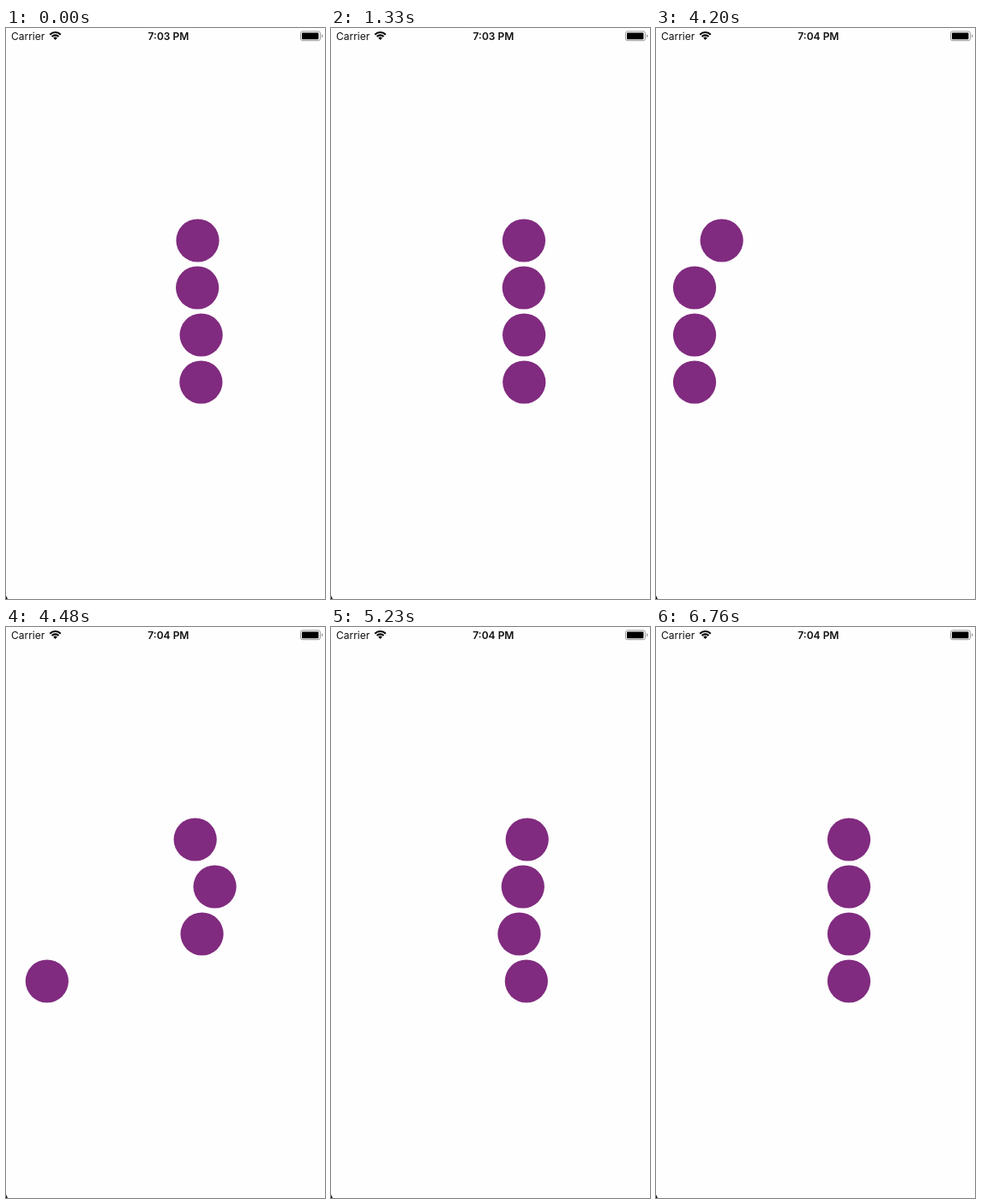
Recreate the animation shown at these times as an HTML page with a canvas. Size 372 px wide and 665 px high, loop 8 s.

```html
<!DOCTYPE html>
<html lang="en">
<head>
<meta charset="utf-8">
<title>Staggered springs</title>
<style>
  html, body { margin: 0; width: 100%; height: 100%; overflow: hidden; background: #fefefe; }
  canvas { display: block; width: 372px; height: 665px; }
</style>
</head>
<body>
<canvas id="stage"></canvas>
<script>
const W = 372, H = 665, LOOP = 8000;
const canvas = document.getElementById('stage');
const ctx = canvas.getContext('2d');
const dpr = window.devicePixelRatio || 1;
canvas.width = W * dpr;
canvas.height = H * dpr;

const LEFT = 45, STAGGER = 0.109, TICK = 58.25;
const DECAY = 2, FREQ = 15.04;

// Two runs of the same spring: the first is already under way at time zero.
const RUNS = [
  { from: 0, lag: 6.95, start: -1316, ticks: 23 },
  { from: 4200, lag: 10.85, start: 4150, ticks: 44 }
];

// Spring value to horizontal travel, steep first and flat near the end.
const TRAVEL = [[0, 0], [0.26, 32], [0.56, 166.8], [1, 180]];

function spring(s) {
  if (s <= 0) return 0;
  const p = FREQ * s;
  return 1 - Math.exp(-DECAY * s) * (Math.cos(p) + DECAY / FREQ * Math.sin(p));
}

function travel(v) {
  let i = 1;
  while (i < TRAVEL.length - 1 && v > TRAVEL[i][0]) i++;
  const [v0, x0] = TRAVEL[i - 1], [v1, x1] = TRAVEL[i];
  return x0 + (x1 - x0) * (v - v0) / (v1 - v0);
}

function ballX(t, i) {
  const run = RUNS[t < RUNS[1].from ? 0 : 1];
  const tick = Math.floor((t - run.from + run.lag) / TICK);
  if (tick >= run.ticks) return LEFT + 180;
  const now = run.from + tick * TICK;
  return LEFT + travel(spring((now - run.start) / 1000 - i * STAGGER));
}

function polygon(points, fill) {
  ctx.beginPath();
  points.forEach(([x, y]) => ctx.lineTo(x, y));
  ctx.closePath();
  ctx.fillStyle = fill;
  ctx.fill();
}

function roundBox(x, y, w, h, r) {
  ctx.beginPath();
  ctx.roundRect(x, y, w, h, r);
}

function wifi(x, y) {
  const a0 = -Math.PI * 0.75, a1 = -Math.PI * 0.25;
  ctx.fillStyle = '#000';
  for (const [inner, outer] of [[0, 3.3], [4.5, 6.6], [7.8, 9.9]]) {
    ctx.beginPath();
    ctx.arc(x, y, outer, a0, a1);
    ctx.arc(x, y, inner, a1, a0, true);
    ctx.fill();
  }
}

function battery() {
  roundBox(343.5, 3.9, 23, 10.8, 2.4);
  ctx.strokeStyle = '#999';
  ctx.lineWidth = 1;
  ctx.stroke();
  roundBox(345, 5.4, 19.5, 7.8, 1);
  ctx.fillStyle = '#000';
  ctx.fill();
  roundBox(368, 7.5, 1.4, 3.6, [0, 1.4, 1.4, 0]);
  ctx.fillStyle = '#999';
  ctx.fill();
}

function statusBar(t) {
  ctx.fillStyle = '#111';
  ctx.textBaseline = 'alphabetic';
  ctx.textAlign = 'left';
  ctx.font = '400 12px Inter, Roboto, sans-serif';
  ctx.fillText('Carrier', 6, 13.6);
  ctx.textAlign = 'center';
  ctx.font = '600 12px Inter, Roboto, sans-serif';
  ctx.fillText(t < 3300 ? '7:03 PM' : '7:04 PM', 189.4, 13.6);
  wifi(57.5, 13.9);
  battery();
}

function pointer() {
  polygon([[29.6, 656.8], [29.6, 666], [39, 666]], '#fff');
  polygon([[30.8, 658.6], [30.8, 666], [38, 666]], '#000');
}

function draw(t) {
  ctx.setTransform(dpr, 0, 0, dpr, 0, 0);
  ctx.fillStyle = '#fefefe';
  ctx.fillRect(0, 0, W, H);
  statusBar(t);
  ctx.fillStyle = '#802b7f';
  for (let i = 0; i < 4; i++) {
    ctx.beginPath();
    ctx.arc(ballX(t, i), 247.5 + 55 * i, 25.1, 0, Math.PI * 2);
    ctx.fill();
  }
  polygon([[0, 661], [2, 665], [0, 665]], '#111');
  if (t >= 2890 && t < 3120) pointer();
}

const began = performance.now();
function loop() {
  draw((performance.now() - began) % LOOP);
  requestAnimationFrame(loop);
}
loop();
</script>
</body>
</html>
```
